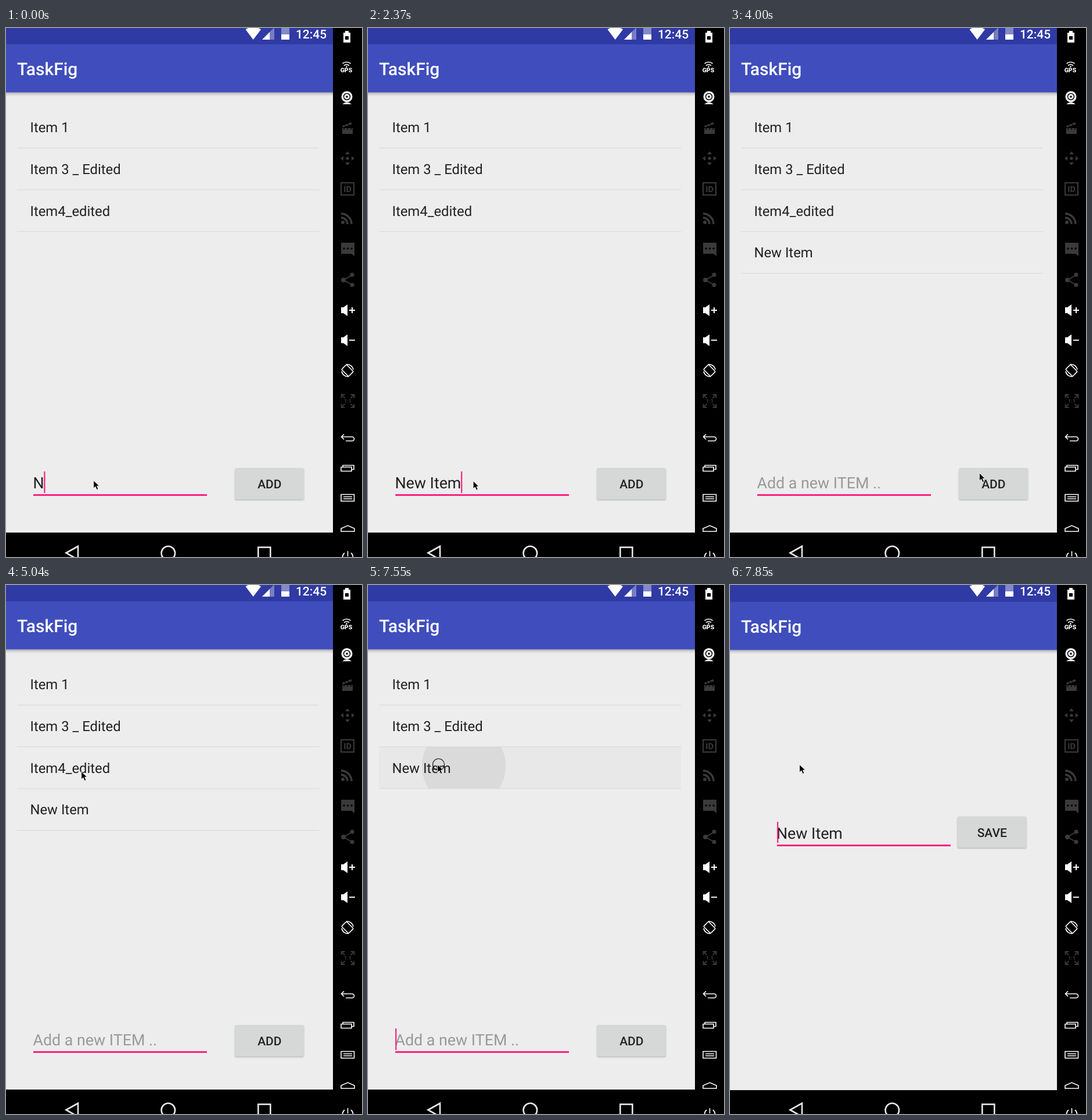
These frames come from a looping animation (613 px wide and 909 px high, 8000 ms). An HTML page:

```html
<!DOCTYPE html>
<html lang="en">
<head>
<meta charset="utf-8">
<title>Task list demo</title>
<style>
html, body { margin: 0; width: 100%; height: 100%; overflow: hidden; background: #000; }
svg { display: block; width: 613px; height: 909px; font-family: Roboto, sans-serif; }
text { white-space: pre; text-rendering: geometricPrecision; }
</style>
</head>
<body>
<svg id="stage" viewBox="0 0 613 909" xmlns="http://www.w3.org/2000/svg"></svg>
<script>
const TICK = 8000 / 54;
const INK = '#212121', PINK = '#fb2280', DIM = '#3a3a3a';
const stage = document.getElementById('stage');

const rect = (x, y, w, h, fill, more = '') =>
  `<rect x="${x}" y="${y}" width="${w}" height="${h}" fill="${fill}" ${more}/>`;
const label = (x, y, size, str, more = '') =>
  `<text x="${x}" y="${y}" font-size="${size}" ${more}>${str}</text>`;
const path = (d, more) => `<path d="${d}" ${more}/>`;
const line = (color, width = 2) => `fill="none" stroke="${color}" stroke-width="${width}"`;
const fill = color => `fill="${color}"`;

function appFrame() {
  return rect(0, 0, 563, 867, '#ededed') +
    rect(0, 110, 563, 8, 'url(#drop)') +
    rect(0, 28, 563, 82.5, '#3f4ebc') +
    rect(0, 0, 563, 28, '#303aa4') +
    label(19, 81, 30, 'TaskFig', 'fill="#fff" font-weight="500"');
}

function button(x, y, str, id) {
  return `<g id="${id}">` +
    rect(x, y + 1.5, 119, 54, '#000', 'id="' + id + 'Shade" rx="3" opacity=".22" filter="url(#soft)"') +
    rect(x, y, 119, 54, '#d6d7d7', 'id="' + id + 'Face" rx="3"') +
    label(x + 59.8, y + 35, 20.9, str, `fill="${INK}" font-weight="500" text-anchor="middle"`) + '</g>';
}

function speaker(y) {
  return path(`M577 ${y - 5}h4l7 -5v20l-7 -5h-4z`, fill('#fff')) +
    path(`M591 ${y}h10`, line('#fff'));
}

function statusIcons() {
  return path('M412.500 2.500Q426 -6 439 2.500L425.700 20z', fill('#fff')) +
    path('M441 20L462 -1V20z', 'fill="#fff" opacity=".35"') +
    path('M441 20L454 7V20z', fill('#fff')) +
    path('M474 0H488V20H474z', 'fill="#fff" opacity=".4"') +
    path('M474 11H488V20H474z', fill('#fff')) +
    label(499, 18, 20.9, '12:45', 'fill="#fff" font-weight="500"');
}

function navIcons() {
  const pen = line('#e8e8e8', 2.6);
  return path('M103.500 902L124 890.500V913.500z', pen) +
    `<circle cx="279.300" cy="902.300" r="11.800" ${pen}/>` +
    `<rect x="434.300" y="892.300" width="21" height="21" ${pen}/>`;
}

function sidebar() {
  const white = line('#fff', 1.6), dim = line(DIM, 2);
  const dot = (x, y, r, c) => `<circle cx="${x}" cy="${y}" r="${r}" fill="${c}"/>`;
  let s = rect(563, 0, 50, 909, '#000');

  s += path('M584 5h6v3h3v17h-12v-17h3z', fill('#fff')) + rect(584, 14, 6, 6, '#000');
  s += path('M579.500 61Q586.500 56 593.500 61M582 64.500Q586.500 61 591 64.500', white) + dot(586.5, 66.5, 1.3, '#fff') +
    label(586, 76, 10.5, 'GPS', 'fill="#fff" font-weight="900" text-anchor="middle"');
  s += dot(587, 118, 9.5, '#fff') + `<circle cx="587" cy="118" r="5.500" ${line('#000', 1.5)}/>` + dot(587, 118, 1.8, '#000') +
    path('M579 131Q587 124 595 131z', fill('#fff'));

  s += path('M579 172h18v10h-18z M579 168l15 -6l2 3l-16 6z', fill(DIM)) +
    path('M583 166l2 3M588 164l2 3M583 172l-2 3M589 172l-2 3M595 172l-2 3', line('#000', 1.2));
  for (let a = 0; a < 360; a += 90)
    s += path('M588 212l4 5h-8z', `fill="${DIM}" transform="rotate(${a} 588 224)"`);
  s += dot(588, 224, 2.6, DIM);
  s += `<rect x="577" y="266" width="22" height="21" ${dim}/>` +
    label(588, 282, 14.5, 'ID', `fill="${DIM}" font-weight="700" text-anchor="middle"`);
  s += dot(580, 334, 3, DIM) + path('M577 326a11 11 0 0 1 11 11M577 319a18 18 0 0 1 18 18', line(DIM, 3.4));
  s += path('M577 369h23v23l-5 -4h-18z', fill(DIM)) + [582, 588.5, 595].map(x => dot(x, 379, 1.7, '#000')).join('');
  s += path('M597 424L581 433L597 442', dim) + dot(581, 433, 4, DIM) + dot(596, 424, 3.6, DIM) + dot(596, 441.5, 3.6, DIM);

  s += speaker(485) + path('M596 480v10', line('#fff')) + speaker(536.5);
  s += `<rect x="582" y="580" width="12" height="17" rx="1.500" ${white} transform="rotate(-45 588 588.500)"/>` +
    path('M586 578a11 11 0 0 1 12 9M590 599a11 11 0 0 1 -12 -9', white);
  for (const [x, y] of [[1, 1], [-1, 1], [1, -1], [-1, -1]])
    s += path('M5 11h6v-6M11 11l-6 -6', `${line(DIM, 1.8)} transform="translate(588.500 641) scale(${x} ${y})"`);
  s += label(588.5, 644, 9, '1:1', `fill="${DIM}" font-weight="700" text-anchor="middle"`);

  s += path('M582 698l-4.500 4.500l4.500 4.500M578 702.500h18a3.500 3.500 0 0 1 0 7h-11', white);
  s += path('M577 754.500h18v7h-18zM580 754v-2.500h19v7h-4', white);
  s += path('M577 813v-11.500h22.500v11.500zM581 805.500h15M581 809h15', white);
  s += path('M577 865v-5l11.500 -5l11.500 5v5z', white);
  s += path('M588.500 899v9M583 902a9 9 0 1 0 11 0', white);
  return s;
}

stage.innerHTML = `
<defs>
  <linearGradient id="drop" x1="0" y1="0" x2="0" y2="1">
    <stop offset="0" stop-color="#a0a2ae"/><stop offset=".5" stop-color="#d6d6d6"/><stop offset="1" stop-color="#ededed"/>
  </linearGradient>
  <filter id="soft" x="-20%" y="-40%" width="140%" height="190%"><feGaussianBlur stdDeviation="1"/></filter>
  <clipPath id="rowClip">${rect(19, 278, 520, 72, '#fff')}</clipPath>
</defs>
${appFrame()}
${rect(19, 278, 520, 72, '#e8e8e8', 'id="rowTint"')}
<circle id="ripple" fill="#dadada" clip-path="url(#rowClip)"/>
<g id="rows"></g>
${label(46.5, 791, 26.8, '', 'id="entry"')}
${rect(47, 801, 299, 3, PINK)}
${rect(47, 762, 2.2, 37, PINK, 'id="caret"')}
${button(394, 756, 'ADD', 'add')}
<g id="editor">${appFrame()}
  ${label(80, 434.5, 26.8, 'New Item', `fill="${INK}"`)}
  ${rect(81, 445, 299, 3, PINK)}
  ${rect(81, 406, 2.2, 36, PINK)}
  ${button(391.5, 396.5, 'SAVE', 'save')}
</g>
${statusIcons()}${navIcons()}${sidebar()}
<g id="pointer">
  <circle id="halo" cx="2.500" cy=".5" r="10" ${line('#111', 1.2)}/>
  ${path('M.7 .5V14L3.900 11.100L6.300 16.500L8.900 15.400L6.600 10.100H10.700z', 'fill="#000" stroke="#fff" stroke-width=".9"')}
</g>`;

const el = id => document.getElementById(id);
const set = (id, attrs) => { for (const k in attrs) el(id).setAttribute(k, attrs[k]); };
const show = (id, on) => set(id, { visibility: on ? 'visible' : 'hidden' });

const typed = [[0, 'N'], [1, 'Ne'], [2, 'New'], [9, 'New '], [10, 'New I'], [12, 'New Ite'], [13, 'New Item'], [22, '']];
const blinks = [6, 9, 17, 20, 25, 28, 32, 35, 39, 42, 45, 48];
const moves = [[0, 150, 777], [15, 150, 777], [20, 442, 785], [24, 442, 785], [25, 442, 784],
  [26, 442, 784], [34, 129, 320], [48, 129, 320], [49, 119, 308], [54, 119, 308]];
const ripples = { 39: [165, 311, 72], 40: [215, 313, 185], 51: [165, 311, 72], 52: [215, 313, 185] };

const latest = (list, n) => list.filter(k => k[0] <= n).pop()[1];
const within = (n, a, b) => n >= a && n <= b;

function pointerAt(n) {
  const i = moves.findIndex(m => m[0] > n);
  const [a, x, y] = moves[i - 1], [b, u, v] = moves[i];
  const p = (n - a) / (b - a), e = p * p * (3 - 2 * p);
  return [x + (u - x) * e, y + (v - y) * e];
}

function drawRows(n) {
  const items = ['Item 1', 'Item 3 _ Edited'];
  if (n < 41) items.push('Item4_edited');
  if (n >= 22) items.push('New Item');
  el('rows').innerHTML = items.map((s, i) =>
    label(41.4, 179 + 71.8 * i, 23.85, s, fill(INK)) +
    rect(19, 205.7 + 71.8 * i, 520, 1, '#d8d8d8')).join('');
}

function draw(n) {
  drawRows(n);

  const text = latest(typed, n), entry = el('entry');
  entry.textContent = text || 'Add a new ITEM ..';
  entry.setAttribute('fill', text ? INK : '#999');
  const caretX = text ? 46.2 + entry.getComputedTextLength() : 47;
  set('caret', { x: caretX });
  show('caret', blinks.filter(b => b <= n).length % 2 === 0);

  const ring = ripples[n], held = within(n, 41, 42);
  show('rowTint', ring || held);
  set('rowTint', { fill: held ? '#e0e0e0' : '#e8e8e8' });
  show('ripple', ring);
  if (ring) set('ripple', { cx: ring[0], cy: ring[1], r: ring[2] });

  const pressed = within(n, 21, 22);
  set('addShade', { y: pressed ? 762 : 757.5, opacity: pressed ? .32 : .22 });
  set('addFace', { fill: pressed ? '#c9caca' : '#d6d7d7' });

  show('editor', n >= 52);
  set('editor', { transform: `translate(0 ${n === 52 ? 33 : 1})`, opacity: n === 52 ? .68 : 1 });

  const [x, y] = pointerAt(n);
  set('pointer', { transform: `translate(${x.toFixed(1)} ${y.toFixed(1)})` });
  show('halo', pressed || within(n, 37, 41) || n === 51);
}

const start = performance.now();
let last = -1;
function loop() {
  const t = (performance.now() - start) % 8000;
  const n = Math.min(53, Math.floor(t / TICK + .1));
  if (n !== last) draw(last = n);
  requestAnimationFrame(loop);
}
loop();
</script>
</body>
</html>
```
